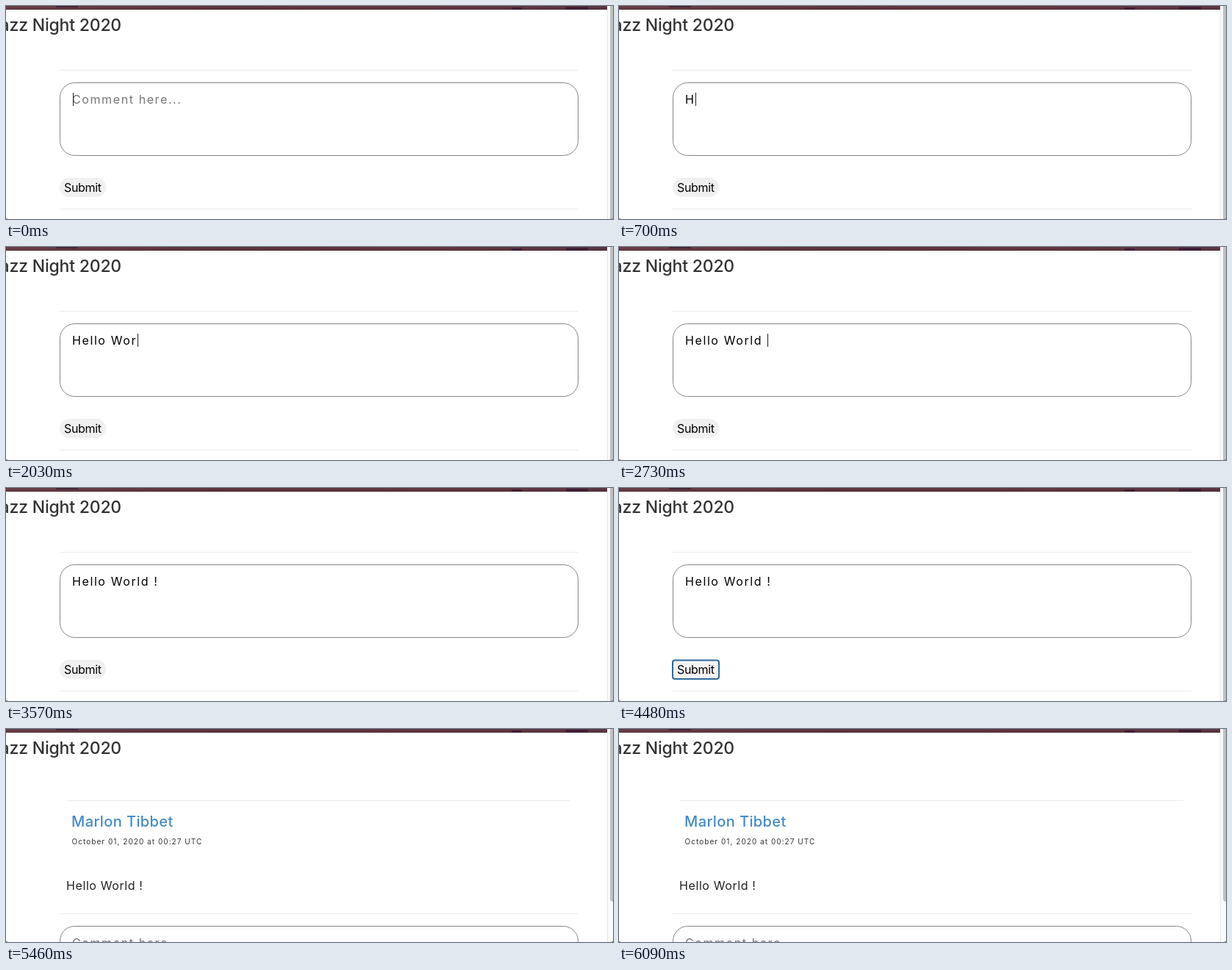
An HTML page with a canvas for the animation above (6160 ms loop, 826 px wide and 290 px high).

```html
<!DOCTYPE html>
<html lang="en">
<head>
<meta charset="utf-8">
<title>Comment form</title>
<style>
html, body { margin: 0; width: 100%; height: 100%; overflow: hidden; background: #fff; }
canvas { display: block; }
</style>
</head>
<body>
<canvas id="stage" width="826" height="290"></canvas>
<script>
const ctx = document.getElementById('stage').getContext('2d');
const LOOP = 6160;
const FOCUS_BUTTON = 4480, POSTED = 4550;
const MESSAGE = 'Hello World !';
const KEY_TIMES = [560, 840, 980, 1120, 1330, 1470, 1750, 1890, 2030, 2450, 2590, 2730, 3010];
const CARET_OFF = [[210, 560], [3570, 4130], [FOCUS_BUTTON, LOOP]];
const TEXT_X = 90;

function setFont(size, spacing = 0, weight = 400) {
  ctx.font = `${weight} ${size}px Inter, Roboto, sans-serif`;
  ctx.letterSpacing = spacing + 'px';
}

function write(text, x, y, color, align = 'left') {
  ctx.textAlign = align;
  ctx.fillStyle = color;
  ctx.fillText(text, x, y);
}

function fill(x, y, w, h, color) {
  ctx.fillStyle = color;
  ctx.fillRect(x, y, w, h);
}

function rounded(x, y, w, h, r) {
  ctx.beginPath();
  ctx.roundRect(x, y, w, h, r);
}

function rule(x1, x2, y) {
  fill(x1, y, x2 - x1, 1, '#ebebeb');
}

function drawBanner() {
  const shade = ctx.createLinearGradient(0, 0, 818, 0);
  shade.addColorStop(0, '#673d45');
  shade.addColorStop(0.35, '#5c343c');
  shade.addColorStop(0.7, '#60363f');
  shade.addColorStop(1, '#593440');
  fill(0, 0, 818, 5, shade);
  fill(0, 4, 818, 1, 'rgba(40, 18, 26, 0.3)');
  const dark = 'rgba(45, 20, 45, 0.6)';
  fill(68, 0, 30, 2, dark);
  fill(688, 2, 14, 3, dark);
  fill(762, 1, 30, 4, dark);
}

function drawPage(posted) {
  fill(0, 0, 826, 290, '#fff');
  drawBanner();
  setFont(23, -0.2, 500);
  write('Jazz Night 2020', 157, 34, '#333', 'right');

  fill(818, 0, 8, 290, '#fafafa');
  fill(818, 0, 1, 290, '#e8e8e8');
  ctx.fillStyle = '#c1c1c1';
  rounded(822, -10, 8, posted ? 245 : 310, 4);
  ctx.fill();
  fill(0, 289, 2, 1, '#888');
  fill(824, 289, 2, 1, '#888');
}

function drawField(y, text, isHint) {
  ctx.strokeStyle = '#858585';
  ctx.lineWidth = 1;
  rounded(73.5, y + 0.5, 705, 99, 20);
  ctx.stroke();
  setFont(16, 1.6);
  write(text, TEXT_X, y + 29, isHint ? '#757575' : '#000');
}

function drawCaret(text) {
  setFont(16, 1.6);
  const x = Math.ceil(TEXT_X + 0.2 + ctx.measureText(text).width);
  fill(x, 118, 1, 18, '#222');
}

function drawButton(focused) {
  if (focused) {
    rounded(73, 234.5, 63, 25.5, 3);
    ctx.fillStyle = '#f3f3f3';
    ctx.fill();
    ctx.strokeStyle = '#2f6a9b';
    ctx.lineWidth = 2;
    ctx.stroke();
  } else {
    rounded(73, 234, 63, 26, 13);
    ctx.fillStyle = '#f0f0f0';
    ctx.fill();
  }
  setFont(16, -0.35);
  write('Submit', 79, 253, '#000');
}

function drawForm(t) {
  const typed = MESSAGE.slice(0, KEY_TIMES.filter(k => t >= k).length);
  rule(73, 779, 87);
  drawField(104, typed || 'Comment here...', !typed);
  if (!CARET_OFF.some(([from, to]) => t >= from && t < to)) drawCaret(typed);
  drawButton(t >= FOCUS_BUTTON);
  rule(73, 779, 276);
}

function drawComment() {
  rule(83, 768, 97);
  setFont(20, 0.4, 500);
  write('Marlon Tibbet', 89, 133, '#428bca');
  setFont(10, 1.05);
  write('October 01, 2020 at 00:27 UTC', 89.5, 157, '#333');
  setFont(16, 0.6);
  write(MESSAGE, 82, 219, '#222');
  rule(73, 779, 251);
  drawField(268, 'Comment here...', true);
}

const start = performance.now();

function frame() {
  const t = (performance.now() - start) % LOOP;
  const posted = t >= POSTED;
  drawPage(posted);
  if (posted) drawComment();
  else drawForm(t);
  requestAnimationFrame(frame);
}

frame();
</script>
</body>
</html>
```
